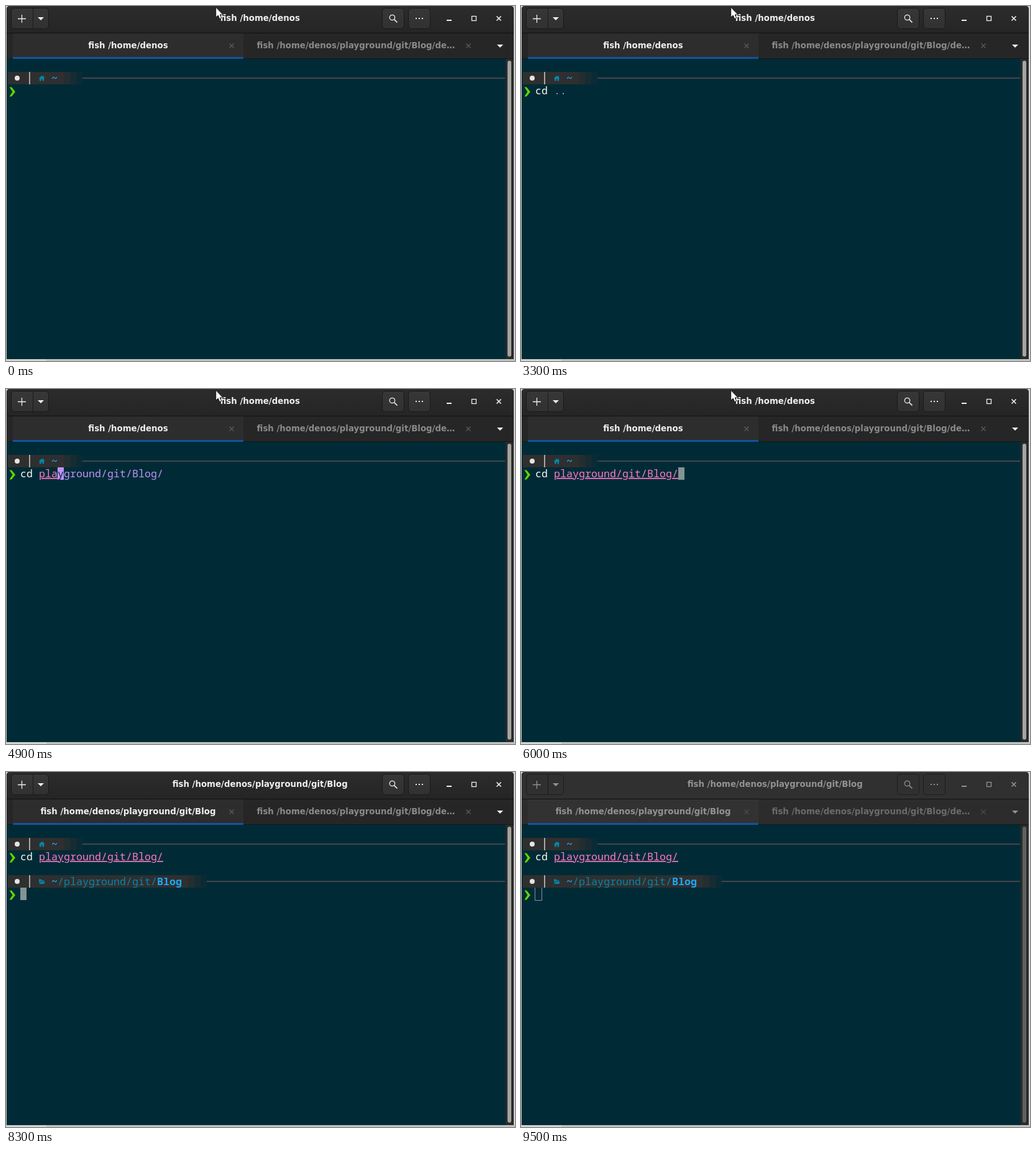
Animation of 819x571 px, one loop 9.6 s. Source, as an HTML page:

```html
<!DOCTYPE html>
<html lang="en">
<head>
<meta charset="utf-8">
<title>Terminal</title>
<style>
  html, body { margin: 0; width: 100%; height: 100%; overflow: hidden; background: #d3d5d2; }
  svg {
    display: block; width: 819px; height: 571px;
    --head: url(#headFill); --btn: url(#btnFill); --edge: #191919;
    --tabs: #262626; --active: #2d2d2d; --ink: #eeeeec; --dim: #8a8a88;
    --faint: #5c5c5a; --thumb: #a4a4a1;
  }
  svg.blur {
    --head: #303030; --btn: #303030; --edge: #1d1d1d;
    --tabs: #2c2c2c; --active: #323232; --ink: #92928f; --dim: #6b6b69;
    --faint: #4c4c4a; --thumb: #60605e;
  }
  .head { fill: var(--head); }
  .btn { fill: var(--btn); stroke: var(--edge); }
  .ink { fill: var(--ink); }
  .line { fill: none; stroke: var(--ink); }
  .faint { fill: none; stroke: var(--faint); stroke-width: 1.3; }
  .ui { font: bold 13.333px "DejaVu Sans", sans-serif; fill: var(--ink); }
  .ui.dim { fill: var(--dim); }
  .mono { font: 16.667px "Noto Sans Mono", "DejaVu Sans Mono", monospace; white-space: pre; }
  .word { fill: #f8f8f2; }
  .error { fill: #ffb86c; }
  .path { fill: #ff79c6; text-decoration: underline; }
  .hint { fill: #bd93f9; }
  .dir { fill: #0087af; }
  .here { fill: #1ba8f5; font-weight: bold; }
</style>
</head>
<body>
<svg id="stage" viewBox="0 0 819 571">
  <defs>
    <linearGradient id="headFill" x2="0" y2="1">
      <stop stop-color="#2c2c2c"/><stop offset="1" stop-color="#252525"/>
    </linearGradient>
    <linearGradient id="btnFill" x2="0" y2="1">
      <stop stop-color="#373737"/><stop offset="1" stop-color="#313131"/>
    </linearGradient>
    <g id="prompt">
      <rect x="3" width="90" height="20" fill="#2f2f2f"/>
      <circle cx="18" cy="10" r="4" fill="#e4e4e4"/>
      <rect x="37" width="2" height="20" fill="#a8a8a8"/>
    </g>
    <path id="home" d="M52.500 10.500 57.500 6 59.500 7.700V6.500H61V9L62.500 10.500H61V14.500H58.500V11.500H56.500V14.500H54V10.500Z" fill="#0087af"/>
    <path id="folder" d="M53 6.500H56.500L57.500 8H61V9.500H55L53 13ZM55.500 10.300H63L61 14H53.500Z" fill="#0087af"/>
    <path id="chevron" d="M5.500 4.500H9L15 12 9 19.500H5.500L10.500 12Z" fill="#5fd700"/>
    <path id="cross" d="M-3.500-3.500 3.500 3.500M3.500-3.500-3.500 3.500"/>
  </defs>

  <path d="M65 568.500H819V571H65Z" fill="#bfc1be"/>
  <path d="M1 568V6Q1 0 7 0H811Q817 0 817 6V568Z" fill="#1c1c1c"/>

  <!-- header bar -->
  <path class="head" d="M1 43V5Q1 0 6 0H812Q817 0 817 5V43Z"/>
  <rect class="btn" x="8.500" y="3.500" width="60" height="33" rx="5"/>
  <path d="M43.500 4V36" stroke="#1b1b1b"/>
  <path class="line" d="M19 20.500H32M25.500 14V27" stroke-width="1.300"/>
  <path class="ink" d="M51 18H61L56 23Z"/>
  <rect class="btn" x="605.500" y="3.500" width="35" height="33" rx="5"/>
  <circle class="line" cx="621.500" cy="18.500" r="4.200" stroke-width="1.300"/>
  <path class="line" d="M624.500 21.500 629.500 26.500" stroke-width="1.700"/>
  <rect class="btn" x="647.500" y="3.500" width="35" height="33" rx="5"/>
  <path class="ink" d="M659 19h2v2h-2zm5 0h2v2h-2zm5 0h2v2h-2z"/>
  <path class="ink" d="M709 22H717V24H709Z"/>
  <rect class="line" x="749.500" y="16.500" width="7" height="7" stroke-width="1.300"/>
  <use href="#cross" class="line" x="793" y="20" stroke-width="1.700"/>
  <text id="title" class="ui" x="408.700" y="24" text-anchor="middle"></text>

  <!-- tabs -->
  <rect x="1" y="44" width="816" height="41" style="fill:var(--tabs)"/>
  <rect x="11" y="44" width="371" height="41" style="fill:var(--active)"/>
  <rect x="1" y="43" width="816" height="1" fill="#111"/>
  <rect x="1" y="84" width="816" height="1" fill="#171717"/>
  <rect x="11" y="82" width="371" height="3" fill="#15539e"/>
  <text id="tab" class="ui" x="196.500" y="68" text-anchor="middle"></text>
  <text id="tab2" class="ui dim" x="403.500" y="68"></text>
  <use href="#cross" class="faint" x="363" y="64"/>
  <use href="#cross" class="faint" x="744" y="64"/>
  <path class="ink" d="M790 62H800L795 67Z"/>

  <!-- terminal -->
  <rect x="1" y="85" width="803" height="483" fill="#002b36"/>
  <rect x="804" y="85" width="13" height="483" fill="#2b2b2b"/>
  <rect x="807" y="88" width="6" height="476" rx="3" style="fill:var(--thumb)"/>
  <g id="first" transform="translate(0 106)">
    <use href="#prompt"/><use href="#home"/>
    <text class="mono" x="73" y="16"><tspan class="here">~</tspan></text>
  </g>
  <use href="#chevron" y="126"/>
  <rect id="cursor" height="20"/>
  <text id="command" class="mono" x="23" y="142"></text>
  <g id="second" transform="translate(0 166)">
    <use href="#prompt"/>
    <rect x="93" width="200" height="20" fill="#2f2f2f"/>
    <use href="#folder"/>
    <text class="mono" x="73" y="16"><tspan class="here">~</tspan><tspan class="dir">/playground/git/</tspan><tspan class="here">Blog</tspan></text>
    <use href="#chevron" y="20"/>
  </g>
  <path id="pointer" d="M337.700 2V18.300L341.300 15.100 343.700 20.700 346.700 19.400 344.300 14H349.300Z" fill="#fff" stroke="#111" stroke-linejoin="round"/>
</svg>
<script>
const LOOP = 9600, CELL = 10, LEFT = 23;
const HOME = "fish /home/denos", DEST = "playground/git/Blog/";
const $ = id => document.getElementById(id);

// time, typed text, suggestion, cursor visible
const typing = [
  [0, "", "", 0],
  [200, "", "", 1],
  [800, "", "", 0],
  [1200, "", "", 1],
  [1500, "c", "lear", 1],
  [1700, "cd", "", 1],
  [2200, "cd", "", 0],
  [2400, "cd ", "", 1],
  [2500, "cd ", "..", 1],
  [3300, "cd ", "..", 0],
  [3500, "cd p", DEST.slice(1), 1],
  [3600, "cd pl", DEST.slice(2), 1],
  [3800, "cd pla", DEST.slice(3), 1],
  [4300, "cd pla", DEST.slice(3), 0],
  [4900, "cd pla", DEST.slice(3), 1],
  [6000, "cd " + DEST, "", 1],
  [6200, "cd " + DEST, "", 0]
];
const within = (t, from, to) => t >= from && t < to;
const show = (el, on) => el.setAttribute("visibility", on ? "visible" : "hidden");
const span = (cls, s, fill) =>
  s ? `<tspan class="${cls}"${fill ? ` style="fill:${fill}"` : ""}>${s}</tspan>` : "";

function set(el, attrs) {
  for (const k in attrs) el.setAttribute(k, attrs[k]);
}

// shaded blocks after a prompt, then the rule up to the scrollbar
function addTail(group, x) {
  const rect = attrs => {
    const r = document.createElementNS("http://www.w3.org/2000/svg", "rect");
    set(r, attrs);
    group.append(r);
  };
  [0.75, 0.5, 0.25].forEach((o, i) =>
    rect({ x: x + i * CELL, width: CELL, height: 20, fill: "#2f2f2f", opacity: o }));
  rect({ x: x + 30, y: 9, width: 773 - x, height: 2, fill: "#46444f" });
}

function drawCommand([, typed, hint, on]) {
  const word = typed.slice(0, 2), path = typed.slice(3);
  $("command").innerHTML =
    span(word === "c" ? "error" : "word", word) +
    (typed.length > 2 ? " " : "") +
    span("path", path) +
    span("hint", hint.slice(0, 1), on ? "#002b36" : "") +
    span("hint", hint.slice(1));
  set($("cursor"), {
    x: LEFT + typed.length * CELL, y: 126, width: CELL,
    height: 20, fill: hint ? "#bd93f9" : "#839496", stroke: "none"
  });
  show($("cursor"), on);
}

function drawNewCursor(t) {
  const hollow = t >= 8500;
  set($("cursor"), hollow
    ? { x: 22.5, y: 185.5, width: 11, height: 21, fill: "none", stroke: "#839496" }
    : { x: LEFT, y: 186, width: CELL, height: 20, fill: "#839496", stroke: "none" });
  show($("cursor"), !within(t, 7200, 7800));
}

function draw(t) {
  drawCommand(typing.findLast(s => s[0] <= t));
  show($("second"), t >= 6700);
  if (t >= 6700) drawNewCursor(t);

  const title = HOME + (t >= 6600 ? "/playground/git/Blog" : "");
  $("title").textContent = title;
  $("tab").textContent = title;

  const passing = within(t, 8500, 8600);
  set($("pointer"), { transform: `translate(${passing ? -229 : 0} 0)` });
  show($("pointer"), t < 8300 || passing);
  $("stage").classList.toggle("blur", t >= 9500);
}

$("tab2").textContent = HOME + "/playground/git/Blog/de…";
addTail($("first"), 93);
addTail($("second"), 293);

const start = performance.now();
function tick() {
  draw((performance.now() - start) % LOOP);
  requestAnimationFrame(tick);
}
draw(0);
requestAnimationFrame(tick);
</script>
</body>
</html>
```
